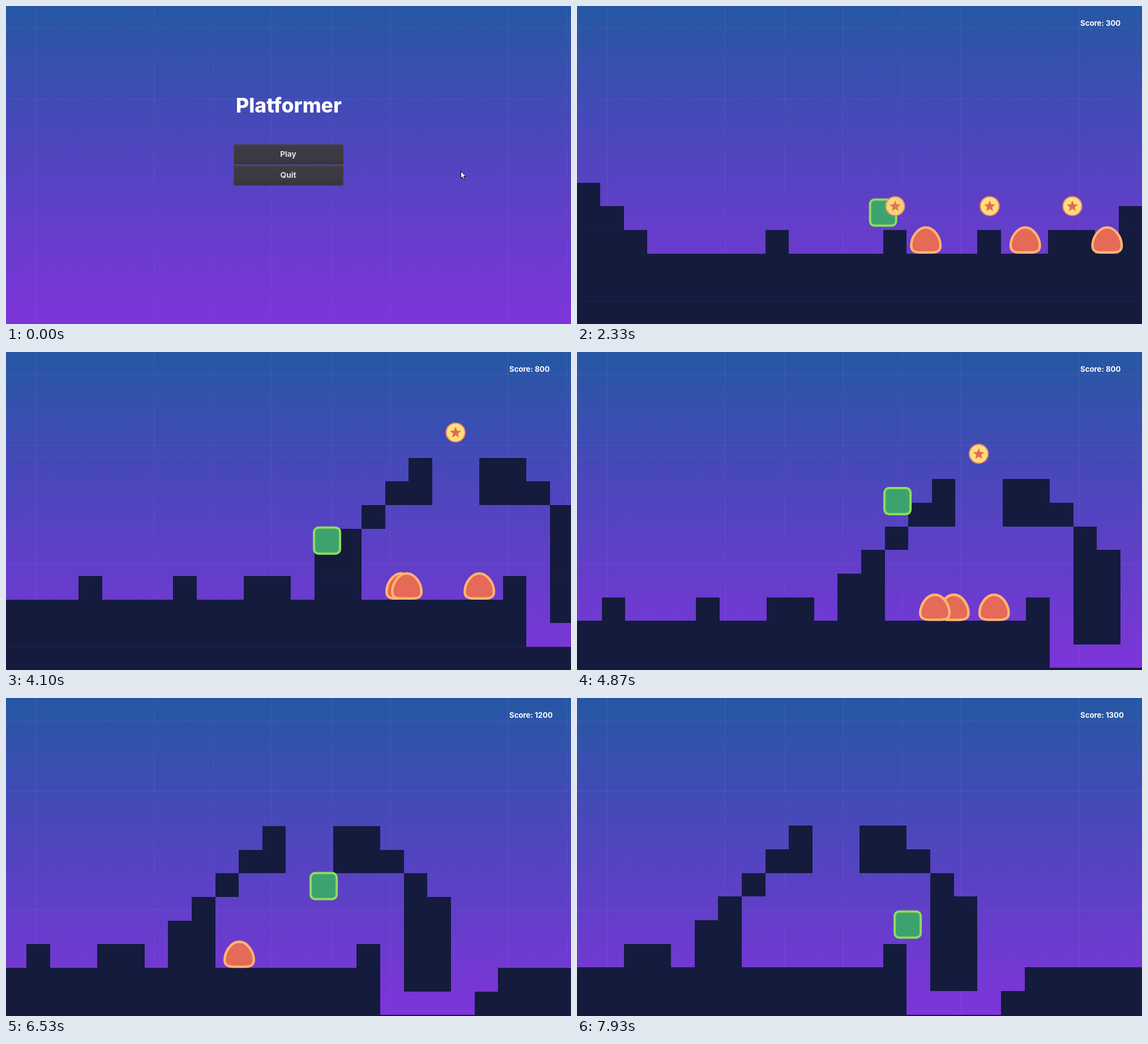
Write an HTML page with a canvas that moves like this. It is 998x561 px and loops after 8000 ms.

```html
<!DOCTYPE html>
<html lang="en">
<head>
<meta charset="utf-8">
<title>Platformer</title>
<style>
html, body { margin: 0; width: 100%; height: 100%; overflow: hidden; background: #5246be; }
canvas { display: block; width: 998px; height: 561px; }
</style>
</head>
<body>
<canvas id="stage" width="998" height="561"></canvas>
<script>
const W = 998, H = 561, LOOP = 8000, GAME_START = 640, STEP = 10;
const TILE = 41.64, GRAVITY = 0.0019, CAMERA_SPEED = 0.009, STOMP = 369;
const ctx = document.getElementById('stage').getContext('2d');

const columnX = c => -0.6 + TILE * c;
const rowY = r => 61.8 + TILE * r;
const clamp = (v, low, high) => Math.min(high, Math.max(low, v));

function buildLevel() {
  const tiles = [];
  const add = (column, top, bottom) => tiles.push({ column, top, bottom });
  for (let c = -1; c < 50; c++) {
    if (c < 3) add(c, Math.max(6, 6 + c), 13);
    else add(c, c < 32 || c > 36 ? 9 : c < 36 ? 11 : 10, 13);
  }
  for (const c of [8, 13, 17, 20, 21, 31]) add(c, 8, 9);
  for (let i = 0; i < 5; i++) {
    add(23 + i, 7 - i, i < 2 ? 9 : Math.max(5, 8 - i));
    add(30 + i, Math.max(3, 2 + i), i < 3 ? 5 : 10);
  }
  return tiles;
}
const level = buildLevel();

function standingY(x) {
  const column = Math.floor((x - columnX(0)) / TILE);
  const tops = level.filter(tile => tile.column === column).map(tile => tile.top);
  return rowY(Math.min(...tops)) - 20.5;
}

// Key poses: time, x and, when not standing on a platform, y
const poses = [
  [640, 172, 220], [900, 190], [1130, 262], [1310, 316, 350], [1600, 370], [2000, 460, STOMP],
  [2360, 548], [2700, 645, STOMP], [3090, 775.3, STOMP], [3560, 925, STOMP], [3840, 979.5],
  [4150, 979.5], [4340, 1021], [4540, 1063], [4640, 1063], [4870, 1063, 225.5], [5190, 1145],
  [5280, 1145], [5500, 1192, 140], [5890, 1203, STOMP], [6210, 1236.5, 226],
  [6530, 1232, 292.5], [7000, 1150, STOMP], [7250, 1180], [7500, 1235], [7760, 1306],
  [7930, 1333.5, 361]
].map(([t, x, y]) => ({ t, x, y: y ?? standingY(x), standing: y === undefined }));

function playerAt(t) {
  const next = poses.findIndex(pose => pose.t > t);
  if (next < 0) return poses[poses.length - 1];
  const a = poses[next - 1], b = poses[next], p = (t - a.t) / (b.t - a.t);
  const walking = a.standing && b.standing && a.y === b.y;
  const arc = walking ? 0 : GRAVITY / 2 * (t - a.t) * (b.t - t);
  return { x: a.x + (b.x - a.x) * p, y: a.y + (b.y - a.y) * p - arc };
}

const coins = [353, 562, 729, 875].map(x => ({ x, y: 353 }));
coins.push({ x: 1206.5, y: 142 });

// Patrols: left end, right end, speed per second, starting phase; one pair walks as one
const slowPair = [1065, 1263, 67.5, 164.75];
const enemies = [
  [402, 512.5, 55, 73], [610, 679.5, 55, 17], [777, 804.4, 55, 21.5], [936, 937, 1, 0],
  slowPair, slowPair, [1069, 1263, 57, 333.8], [1073, 1217.5, 134.4, 268.5]
].map(([left, right, speed, phase]) => ({ left, right, speed, phase }));

function enemyX({ left, right, speed, phase }, t) {
  const span = right - left;
  return right - Math.abs(span - (speed * t / 1000 + phase) % (2 * span));
}

// Plays the game once, noting hits and the camera at every step
function simulate() {
  const views = [];
  const ease = 1 - Math.exp(-CAMERA_SPEED * STEP);
  let anchorX = 0, anchorY = 0, x = 0, y = null;
  for (let t = GAME_START; t <= LOOP; t += STEP) {
    const player = playerAt(t);
    anchorX = Math.max(0, clamp(anchorX, player.x - 565, player.x - 433));
    anchorY = Math.min(0, clamp(anchorY, player.y - 322, player.y - 266));
    x += (anchorX - x) * ease;
    y = y === null ? anchorY : y + (anchorY - y) * ease;
    views[t / STEP] = { x, y: Math.abs(y) < 0.3 ? 0 : y };
    for (const coin of coins)
      if (Math.abs(coin.x - player.x) < 36 && Math.abs(coin.y - player.y) < 36) coin.hit ??= t;
    for (const enemy of enemies)
      if (player.y >= STOMP - 1 && Math.abs(enemyX(enemy, t) - player.x) < 32) enemy.hit ??= t;
  }
  return views;
}
const views = simulate();

function makeBackground() {
  const canvas = document.createElement('canvas');
  canvas.width = W;
  canvas.height = H;
  const g = canvas.getContext('2d');
  const sky = g.createLinearGradient(0, 10, 0, 540);
  sky.addColorStop(0, '#2757a4');
  sky.addColorStop(0.35, '#4549b8');
  sky.addColorStop(1, '#7c35d8');
  g.fillStyle = sky;
  g.fillRect(0, 0, W, H);
  const line = (x, y, w, h, alpha) => {
    g.fillStyle = `rgba(190,170,255,${alpha})`;
    g.fillRect(Math.round(x), Math.round(y), w, h);
  };
  for (let k = 0; k < 48; k++) {
    const x = 12 + TILE / 2 * k;
    line(x, 0, 1, 40 + k * 37 % 23, 0.02);
    for (const y of [97, 253, 410]) line(x, y, 1, 28 + k * 29 % 50, 0.03);
  }
  for (let x = 53; x < W; x += TILE * 5) line(x, 0, 1, H, 0.1);
  for (const x of [366, 574, 990]) line(x, 0, 1, H, 0.07);
  for (const y of [39, 164, 373]) line(0, y, W, 1, 0.1);
  for (const y of [102, 123, 185, 268, 476, 498]) line(0, y, W, 1, 0.05);
  return canvas;
}
const background = makeBackground();

function text(str, x, y, size, weight, color, align) {
  ctx.font = `${weight} ${size}px Inter, "Open Sans", sans-serif`;
  ctx.textAlign = align;
  ctx.fillStyle = color;
  ctx.fillText(str, x, y);
}

function roundBox(x, y, w, h, r) {
  ctx.beginPath();
  ctx.roundRect(x, y, w, h, r);
}

function paint(path, fill, stroke, width) {
  ctx.fillStyle = fill;
  ctx.strokeStyle = stroke;
  ctx.lineWidth = width;
  ctx.fill(path);
  ctx.stroke(path);
}

function button(label, y, hover) {
  const face = ctx.createLinearGradient(0, y, 0, y + 36);
  face.addColorStop(0, hover ? '#565260' : '#45414b');
  face.addColorStop(0.12, hover ? '#4b4753' : '#3e3b44');
  face.addColorStop(0.75, hover ? '#494551' : '#3c3942');
  face.addColorStop(1, '#36333c');
  roundBox(402, y, 194, 36, 2);
  ctx.fillStyle = face;
  ctx.fill();
  roundBox(402.75, y + 0.75, 192.5, 34.5, 2);
  ctx.strokeStyle = 'rgba(80,75,87,.35)';
  ctx.lineWidth = 1.5;
  ctx.stroke();
  text(label, 498.5, y + 22, 13.7, 700, '#e2e1e4', 'center');
}

const ARROW = new Path2D('M0 0V12.4L2.8 9.9L4.8 14.5L6.9 13.6L4.9 9.1H8.7Z');

function drawMenu(t) {
  const p = clamp((t - 80) / 350, 0, 1), glide = p * p * (3 - 2 * p);
  const x = 803 - 263 * glide, y = 291 - 25 * glide;
  text('Platformer', 499.5, 188, 35.6, 800, '#fff', 'center');
  button('Play', 244, x < 596 && y < 280);
  button('Quit', 281, false);
  ctx.save();
  ctx.translate(x + 0.5, y + 0.5);
  paint(ARROW, '#fff', '#000', 1);
  ctx.restore();
}

function drawLevel(view) {
  const seams = view.y === 0 ? [8, 11] : view.y > -31 ? [6, 9] : [];
  for (const { column, top, bottom } of level) {
    const x = Math.round(columnX(column) - view.x);
    const width = Math.round(columnX(column + 1) - view.x) - x;
    const y = Math.round(rowY(top) - view.y);
    ctx.fillStyle = '#141b3d';
    ctx.fillRect(x, y, width, Math.round(rowY(bottom) - view.y) - y);
    ctx.fillStyle = '#1d2255';
    for (const r of seams)
      if (top <= r && r < bottom) ctx.fillRect(x, Math.round(rowY(r) - view.y), width, 1);
  }
}

const DOME = new Path2D('M0-46.4C15-46.4 25.8-28 25.8-14C25.8-5 20-2.2 10-2.2H-10C-20-2.2-25.8-5-25.8-14C-25.8-28-15-46.4 0-46.4Z');

function drawEnemy(x, y) {
  ctx.save();
  ctx.translate(x, y);
  paint(DOME, '#e56a57', '#ffb46f', 4.4);
  ctx.restore();
}

const DISC = new Path2D();
DISC.arc(0, 0, 16.5, 0, Math.PI * 2);
const STAR = new Path2D();
for (let i = 0; i < 10; i++) {
  const r = i % 2 ? 4.6 : 10.4, a = i * Math.PI / 5;
  STAR.lineTo(r * Math.sin(a), 0.5 - r * Math.cos(a));
}

function drawCoin(x, y, alpha) {
  ctx.save();
  ctx.globalAlpha = alpha;
  ctx.translate(x, y);
  paint(DISC, '#ffe07a', '#f98d68', 2.2);
  ctx.fillStyle = '#e56a52';
  ctx.fill(STAR);
  ctx.restore();
}

function drawPlayer(x, y) {
  roundBox(x - 23, y - 23, 46, 46, 8);
  ctx.fillStyle = '#3da36e';
  ctx.fill();
  ctx.strokeStyle = '#8fdc5a';
  ctx.lineWidth = 4;
  ctx.stroke();
}

function drawGame(t) {
  const view = views[t / STEP], player = playerAt(t);
  drawLevel(view);
  drawPlayer(player.x - view.x, player.y - view.y);
  for (const { x, y, hit } of coins) {
    const alpha = Math.min(1, 1 - (t - hit) / 580);
    if (alpha > 0) drawCoin(x - view.x, y - view.y, alpha);
  }
  for (const enemy of enemies)
    if (!(t >= enemy.hit)) drawEnemy(enemyX(enemy, t) - view.x, 437 - view.y);
  const score = 100 * [...coins, ...enemies].filter(item => item.hit <= t).length;
  text('Score: ' + score, 889, 34.5, 13.2, 700, '#fff', 'left');
}

function frame(now) {
  const t = Math.round(now % LOOP / STEP) * STEP;
  ctx.drawImage(background, 0, 0);
  if (t < GAME_START) drawMenu(t);
  else drawGame(t);
  requestAnimationFrame(frame);
}
frame(0);
</script>
</body>
</html>
```
